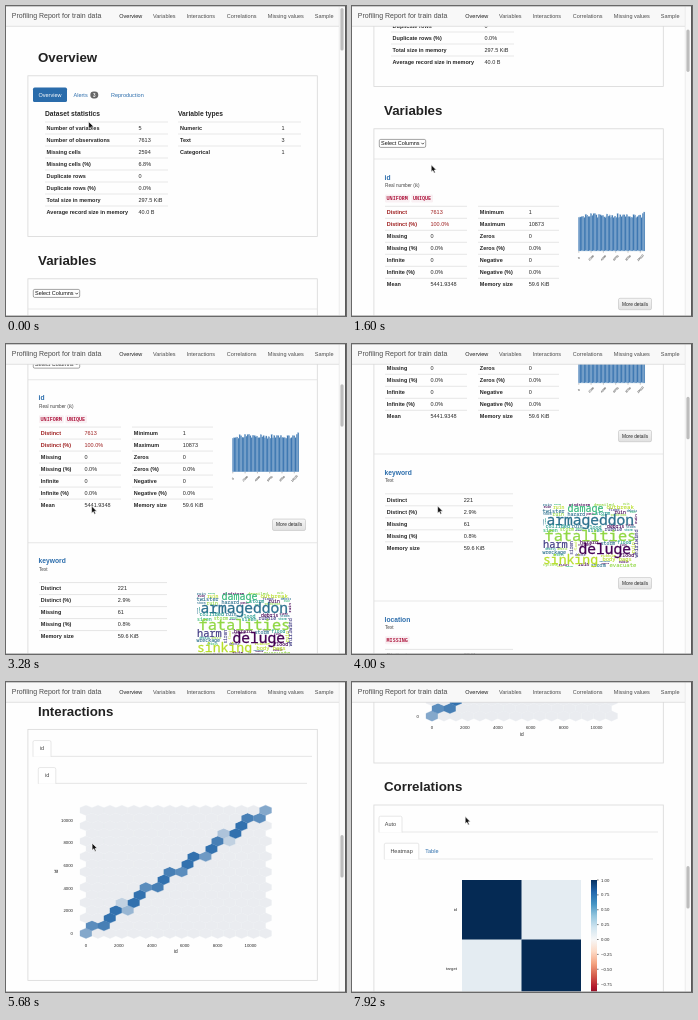
These frames come from a looping animation (340 by 310 pixels, 8 s). An HTML page:

```html
<!DOCTYPE html>
<html lang="en">
<head>
<meta charset="utf-8">
<title>Profiling report</title>
<style>
html, body { margin: 0; width: 100%; height: 100%; overflow: hidden; background: #fff; }
svg { display: block; width: 100vw; height: 100vh; }
text { font-family: "Liberation Sans", Arial, sans-serif; white-space: pre; }
.mono { font-family: "Noto Sans Mono", "DejaVu Sans Mono", monospace; }
</style>
</head>
<body>
<svg id="stage" viewBox="0 0 340 310">
  <defs>
    <linearGradient id="rdbu" x1="0" y1="0" x2="0" y2="1"></linearGradient>
    <linearGradient id="button" x1="0" y1="0" x2="0" y2="1">
      <stop offset="0" stop-color="#f6f6f6"/>
      <stop offset="1" stop-color="#e0e0e0"/>
    </linearGradient>
  </defs>
  <rect width="340" height="310" fill="#fefefe"/>
  <g id="page"></g>
  <g id="chrome"></g>
  <path id="cursor" d="M0 0V7.2L1.7 5.7L2.9 8.3L4.1 7.8L3 5.2H5.2Z" fill="#111" stroke="#fff" stroke-width=".6"/>
</svg>
<script>
const NS = 'http://www.w3.org/2000/svg';
const $ = id => document.getElementById(id);
const page = $('page'), chrome = $('chrome');
const BLUE = '#2a6cab', INK = '#262626', RED = '#9e1f1f', LINE = '#ddd';
let root = page;

function add(tag, attrs, parent = root) {
  const el = document.createElementNS(NS, tag);
  for (const k in attrs) el.setAttribute(k, attrs[k]);
  return parent.appendChild(el);
}
function text(str, x, y, size = 5.5, fill = INK, extra = {}) {
  const el = add('text', { x, y, 'font-size': size, fill, ...extra });
  el.textContent = str;
  return el;
}
const bold = { 'font-weight': 700 };
const middle = { 'text-anchor': 'middle' };
const right = { 'text-anchor': 'end' };
const rect = (x, y, width, height, fill, extra = {}) =>
  add('rect', { x, y, width, height, fill, ...extra });
const hline = (x1, x2, y, stroke = LINE) =>
  add('line', { x1, x2, y1: y, y2: y, stroke, 'stroke-width': .7 });
const box = (top, bottom) =>
  rect(21.9, top, 289.4, bottom - top, 'none', { stroke: '#d8d8d8', 'stroke-width': .8 });
const heading = (str, y) => text(str, 32, y + 4.8, 13.3, '#222', bold);

function rng(seed) {
  return () => (seed = (seed * 16807) % 2147483647) / 2147483647;
}

// Rows are "label|value"; redRows lists highlighted indices.
function table(rows, y, x1, x2, labelX, valueX, redRows = []) {
  rows.forEach((row, i) => {
    const [label, value] = row.split('|');
    const cy = y + i * 12, fill = redRows.includes(i) ? RED : INK;
    hline(x1, x2, cy - 6);
    text(label, labelX, cy + 1.9, 5.5, fill, bold);
    text(value, valueX, cy + 1.9, 5.5, fill);
  });
}
function button(y) {
  rect(266.5, y - 5.7, 33, 11.4, 'url(#button)', { rx: 1.5, stroke: '#c8c8c8', 'stroke-width': .7 });
  text('More details', 283, y + 1.7, 4.8, INK, middle);
}
function badge(str, x, y) {
  rect(x, y - 4, str.length * 3.05 + 3.4, 8, '#f9f0f3', { rx: 1.2 });
  text(str, x + 1.6, y + 1.8, 5.05, '#b01c42', { class: 'mono', 'font-weight': 600 });
}
function title(name, kind, y) {
  text(name, 32.6, y + 2.5, 6.7, BLUE, bold);
  text(kind, 33, y + 9.8, 4.7, '#444');
}
function tab(str, x, w, bottom, end) {
  hline(x, end, bottom);
  add('path', {
    d: `M${x} ${bottom + .4}v-14.6q0-1.6 1.6-1.6h${w - 3.2}q1.6 0 1.6 1.6v14.6`,
    fill: '#fff', stroke: LINE, 'stroke-width': .7
  });
  text(str, x + w / 2, bottom - 6, 5.5, '#444', middle);
}

const VIRIDIS = ['#440154', '#433e85', '#2c718e', '#1f988b', '#35b779', '#90d743', '#b8de29'];
// Words are [text, x, baseline, size, colour index, vertical?] relative to the cloud's corner.
function cloud(x0, y0, words, small, seed) {
  const rand = rng(seed), pool = small.split(' ');
  const put = ([str, x, y, size, c, up]) => text(str, 0, 0, size, VIRIDIS[c], {
    class: 'mono', stroke: VIRIDIS[c], 'stroke-width': size * .02,
    transform: `translate(${x0 + x} ${y0 + y})` + (up ? ' rotate(-90)' : '')
  });
  const bounds = ([str, x, y, size, , up]) => {
    const len = str.length * size * .6, h = size * .56;
    return up ? [x - h, y - len, x, y] : [x, y - h, x + len, y];
  };
  const taken = words.map(bounds);
  const tries = 5000;
  for (let i = 0; i < tries; i++) {
    const str = pool[Math.floor(rand() * pool.length)];
    const size = 5 - 3 * i / tries, up = rand() < .25;
    const len = str.length * size * .6, h = size * .56;
    const x = up ? h + rand() * (95 - h) : rand() * (95 - len);
    const y = up ? len + rand() * (64 - len) : h + rand() * (64 - h);
    const word = [str, x, y, size, Math.floor(rand() * 7), up];
    const [l, t, r, b] = bounds(word);
    if (taken.some(([x1, y1, x2, y2]) => l < x2 && r > x1 && t < y2 && b > y1)) continue;
    taken.push([l, t, r, b]);
    put(word);
  }
  words.forEach(put);
}

function overview() {
  heading('Overview', 51);
  box(69.8, 230.5);
  rect(27, 81.6, 34, 14.4, BLUE, { rx: 1.6 });
  text('Overview', 44, 90.8, 5.5, '#fff', middle);
  text('Alerts', 67.6, 90.8, 5.5, BLUE);
  rect(84.3, 85.6, 8, 6.8, '#666', { rx: 3.4 });
  text('3', 88.3, 90.7, 4.6, '#fff', { ...bold, ...middle });
  text('Reproduction', 105, 90.8, 5.5, BLUE);
  text('Dataset statistics', 39, 110.2, 6.7, INK, bold);
  text('Variable types', 172, 110.2, 6.7, INK, bold);
  table(['Number of variables|5', 'Number of observations|7613', 'Missing cells|2594',
    'Missing cells (%)|6.8%', 'Duplicate rows|0', 'Duplicate rows (%)|0.0%',
    'Total size in memory|297.5 KiB', 'Average record size in memory|40.0 B'],
    122, 39, 162, 40.6, 132.5);
  table(['Numeric|1', 'Text|3', 'Categorical|1'], 122, 172, 295, 174, 275.5);
}

function numericVariable() {
  title('id', 'Real number (ℝ)', 321);
  badge('UNIFORM', 33, 342.4);
  badge('UNIQUE', 59.3, 342.4);
  table(['Distinct|7613', 'Distinct (%)|100.0%', 'Missing|0', 'Missing (%)|0.0%',
    'Infinite|0', 'Infinite (%)|0.0%', 'Mean|5441.9348'], 356.3, 33, 115, 34.8, 78.5, [0, 1]);
  table(['Minimum|1', 'Maximum|10873', 'Zeros|0', 'Zeros (%)|0.0%',
    'Negative|0', 'Negative (%)|0.0%', 'Memory size|59.6 KiB'], 356.3, 126, 207, 127.8, 176.7);
  const rand = rng(77), step = 66.5 / 50;
  for (let i = 0; i < 50; i++) {
    const h = i === 49 ? 39 : 33.5 + rand() * 4;
    rect(226.4 + i * step, 395 - h, step, h, '#3a75b0', { stroke: '#9dbcd9', 'stroke-width': .25 });
  }
  for (let i = 0; i < 6; i++) {
    const x = 226.8 + i * 12.3;
    add('line', { x1: x, x2: x, y1: 395.3, y2: 396.6, stroke: '#555', 'stroke-width': .4 });
    text(i * 2000, 0, 0, 3, '#222', {
      ...middle, transform: `translate(${x + .8} 402.6) rotate(-45)`
    });
  }
  button(448);
}

function textVariable(name, y, rowY, values, redRows) {
  hline(22, 311, y - 18);
  title(name, name === 'target' ? 'Categorical' : 'Text', y);
  const labels = ['Distinct', 'Distinct (%)', 'Missing', 'Missing (%)', 'Memory size'];
  table(labels.map((l, i) => l + '|' + values[i]), rowY, 33, 161, 34.8, 111.8, redRows);
  button(rowY + 83.5);
}

function variables() {
  heading('Variables', 254.6);
  box(272.8, 1063);
  rect(27.3, 283.4, 46.4, 8, '#fff', { rx: 1.4, stroke: '#666', 'stroke-width': .6 });
  text('Select Columns', 29, 289.2, 5.5, '#111');
  add('path', { d: 'M69.4 286.8l1.3 1.4l1.3-1.4', fill: 'none', stroke: '#111', 'stroke-width': .7 });
  hline(22, 311, 303);
  numericVariable();

  textVariable('keyword', 484, 511.8, ['221', '2.9%', '61', '0.8%', '59.6 KiB']);
  cloud(190.5, 515.5, [
    ['armageddon', 4, 21, 14.6, 2], ['fatalities', 2, 37.4, 15.3, 5], ['deluge', 36, 50.5, 14.6, 0],
    ['harm', .5, 44.8, 10.3, 1], ['sinking', .5, 60, 13.1, 6], ['damage', 25, 8.2, 10, 4],
    ['outbreak', 64, 5.6, 5.7, 6], ['twister', 0, 9, 5.3, 2], ['collided', 3, 24.2, 5.1, 3],
    ['wreckage', 0, 50, 4.9, 2], ['evacuate', 67, 63, 5.6, 5], ['body bags', 60, 57.5, 5.4, 6],
    ['whirlwind', 95, 54, 5.2, 1, true]
  ], 'hazard flood storm debris sandstorm derailed cyclone ruin panic rubble windstorm siren', 11);

  textVariable('location', 631, 667.4, ['3341', '65.8%', '2533', '33.3%', '59.6 KiB'], [2, 3]);
  badge('MISSING', 33, 652.2);
  cloud(190.5, 672.5, [
    ['usa', 1.5, 43.5, 46, 3], ['the', 47, 16.5, 23, 2], ['new', 5, 63, 34, 0],
    ['ca', 69, 57, 22, 2], ['london', 67.5, 63.3, 8, 6], ['united', 94, 38, 6.5, 4, true],
    ['city', 2, 8, 9, 5], ['york', 6, 16.5, 15, 1]
  ], 'north south west east city state uk united park of in world lake canada texas', 23);

  textVariable('text', 787, 814.3, ['7503', '98.6%', '0', '0.0%', '59.6 KiB']);
  cloud(190.5, 818, [
    ['the', 2.5, 49.5, 41, 5], ['in', 1, 17.5, 24, 6], ['a', 61, 20, 33, 3], ['of', 95.5, 56.5, 22, 1, true],
    ['to', 95.5, 30, 22, 1, true], ['and', 15, 64, 21, 6], ['is', 58, 62.5, 17, 1],
    ['on', 2, 63, 11, 3], ['you', 77, 61.5, 9.5, 5], ['I', 35, 17, 22, 3], ['was', 12, 4, 6, 4],
    ['for', 59, 18, 8, 2, true]
  ], 'this be that by my have from it with at are just like your me but out as up', 31);

  textVariable('target', 934, 961.3, ['2', '< 0.1%', '0', '0.0%', '59.6 KiB']);
  [4342, 3271].forEach((n, i) => {
    const y = 955.4 + i * 8.8, w = 115.6 * n / 4342;
    rect(190, y, w, 8, BLUE);
    text(i, 187.3, y + 5.9, 5.2, INK, right);
    text(n, 190 + w / 2, y + 5.6, 4.7, '#fff', { ...bold, ...middle });
  });
}

function hexbin(x0, y0) {
  const dx = 11.97, dy = 7.69;
  // Opacity digits per row, starting at the first filled column.
  const fill = ['5', '78', '9', '94', '29', '9', '78', '9', '87', '9', '96', '9', '82', '39', '9', '87', '5'];
  const start = [0, 0, 2, 2, 3, 4, 5, 6, 7, 8, 9, 10, 11, 11, 13, 13, 15];
  const hex = (x, y, color) => add('path', {
    d: `M${x} ${y - 5.13}l5.99 2.57v5.13l-5.99 2.57l-5.99-2.57v-5.13Z`,
    fill: color, stroke: color, 'stroke-width': .3
  });
  const mix = a => `rgb(${[42, 108, 171].map((c, k) => Math.round([234, 236, 240][k] * (1 - a) + c * a))})`;
  fill.forEach((digits, r) => {
    for (let i = 0; i < 16 - r % 2; i++) {
      const d = +(digits[i - start[r]] || 0);
      hex(x0 + dx * (i + r % 2 / 2), y0 - dy * r, mix(d / 9.4));
    }
  });
  for (let i = 0; i < 6; i++) {
    text(i * 2000, x0 + 32.9 * i, y0 + 13.3, 4.3, '#222', middle);
    text(i * 2000, x0 - 13, y0 + 1.5 - 22.6 * i, 4.3, '#222', right);
  }
  text('id', x0 + 89.8, y0 + 20, 4.8, '#222', middle);
  text('id', 0, 0, 4.8, '#222', { ...middle, transform: `translate(${x0 - 28.5} ${y0 - 62}) rotate(-90)` });
}

function interactions() {
  heading('Interactions', 1088);
  box(1106, 1357);
  tab('id', 27, 18, 1133, 306);
  tab('id', 32.3, 17.5, 1160, 301);
  hexbin(80, 1310);
}

function correlations() {
  heading('Correlations', 1380.2);
  box(1399, 1650);
  tab('Auto', 27, 23, 1426, 306);
  tab('Heatmap', 32.3, 34.5, 1453, 301);
  text('Table', 73.3, 1447, 5.5, BLUE);
  const x = 110, y = 1474, c = 59.5;
  rect(x, y, 2 * c, 2 * c, '#e4ecf2');
  rect(x, y, c, c, '#052a54');
  rect(x + c, y + c, c, c, '#052a54');
  text('id', 105, y + 31, 4.3, '#222', right);
  text('target', 105, y + 90.3, 4.3, '#222', right);
  ['#053061', '#2166ac', '#4393c3', '#92c5de', '#d1e5f0', '#f7f7f7',
    '#fddbc7', '#f4a582', '#d6604d', '#b2182b', '#67001f'].forEach((color, i) =>
    add('stop', { offset: i / 10, 'stop-color': color }, $('rdbu')));
  rect(239, y, 6, 2 * c, 'url(#rdbu)');
  for (let i = 0; i < 9; i++) {
    const v = 1 - i / 4, ty = y + i * c / 4;
    hline(245, 246.6, ty, '#444');
    text((v < 0 ? '−' : '') + Math.abs(v).toFixed(2), 249, ty + 1.5, 4.3, '#222');
  }
}

function navbar() {
  root = chrome;
  rect(0, 0, 333, 20.2, '#f8f8f8');
  hline(0, 333, 20.3, '#d6d6d6');
  text('Profiling Report for train data', 5.8, 12.3, 7, '#4c4c4c');
  [['Overview', 113.3], ['Variables', 147], ['Interactions', 180.7], ['Correlations', 220.8],
    ['Missing values', 261.8], ['Sample', 308.8]].forEach(([str, x], i) =>
    text(str, x, 12, 5.5, i ? '#4c4c4c' : '#1c1c1c'));
  rect(333, 0, 7, 310, '#fafafa');
  add('line', { x1: 333.2, x2: 333.2, y1: 0, y2: 310, stroke: '#e2e2e2', 'stroke-width': .6 });
  rect(0, 0, 340, .7, '#b5b5b5');
  rect(0, 309.2, 340, .8, '#b5b5b5');
  rect(339, 0, 1, 310, '#5a5a5a');
  return rect(334.4, 2, 3.2, 42.5, '#bdbdbd', { rx: 1.6 });
}

overview();
variables();
interactions();
correlations();
const thumb = navbar();

// Monotone cubic through [time, value] points.
function curve(pts) {
  const n = pts.length;
  const slope = i => (pts[i + 1][1] - pts[i][1]) / (pts[i + 1][0] - pts[i][0]);
  const m = pts.map((_, i) => {
    if (i === 0) return slope(0);
    if (i === n - 1) return slope(n - 2);
    const a = slope(i - 1), b = slope(i);
    return a * b <= 0 ? 0 : 2 * a * b / (a + b);
  });
  return t => {
    let i = 0;
    while (i < n - 2 && t > pts[i + 1][0]) i++;
    const h = pts[i + 1][0] - pts[i][0];
    const u = Math.min(1, Math.max(0, (t - pts[i][0]) / h)), w = 1 - u;
    return pts[i][1] * (1 + 2 * u) * w * w + h * m[i] * u * w * w
      + pts[i + 1][1] * u * u * (3 - 2 * u) - h * m[i + 1] * u * u * w;
  };
}
const scroll = curve([[0, 0], [1600, 150], [2640, 215], [4000, 356], [4800, 663],
  [5920, 1094], [6080, 1094], [6480, 1110], [6560, 1110], [6640, 1112], [7920, 1276]]);
const curX = curve([[0, 82.6], [1600, 79.2], [2640, 85.6], [4800, 85.6], [6640, 87.6], [7920, 113.2]]);
const curY = curve([[0, 115.6], [1600, 158.8], [2640, 162], [4800, 162], [6640, 158.6], [7920, 134.6]]);

const LOOP = 8000, STEP = 80;
function draw(ms) {
  const t = Math.floor(ms % LOOP / STEP) * STEP;
  const s = scroll(t);
  page.setAttribute('transform', `translate(0 ${-s})`);
  thumb.setAttribute('y', 2 + s * .1427);
  $('cursor').setAttribute('transform', `translate(${curX(t)} ${curY(t)})`);
}
let begin;
function tick(now) {
  begin ??= now;
  draw(now - begin);
  requestAnimationFrame(tick);
}
draw(0);
requestAnimationFrame(tick);
</script>
</body>
</html>
```
